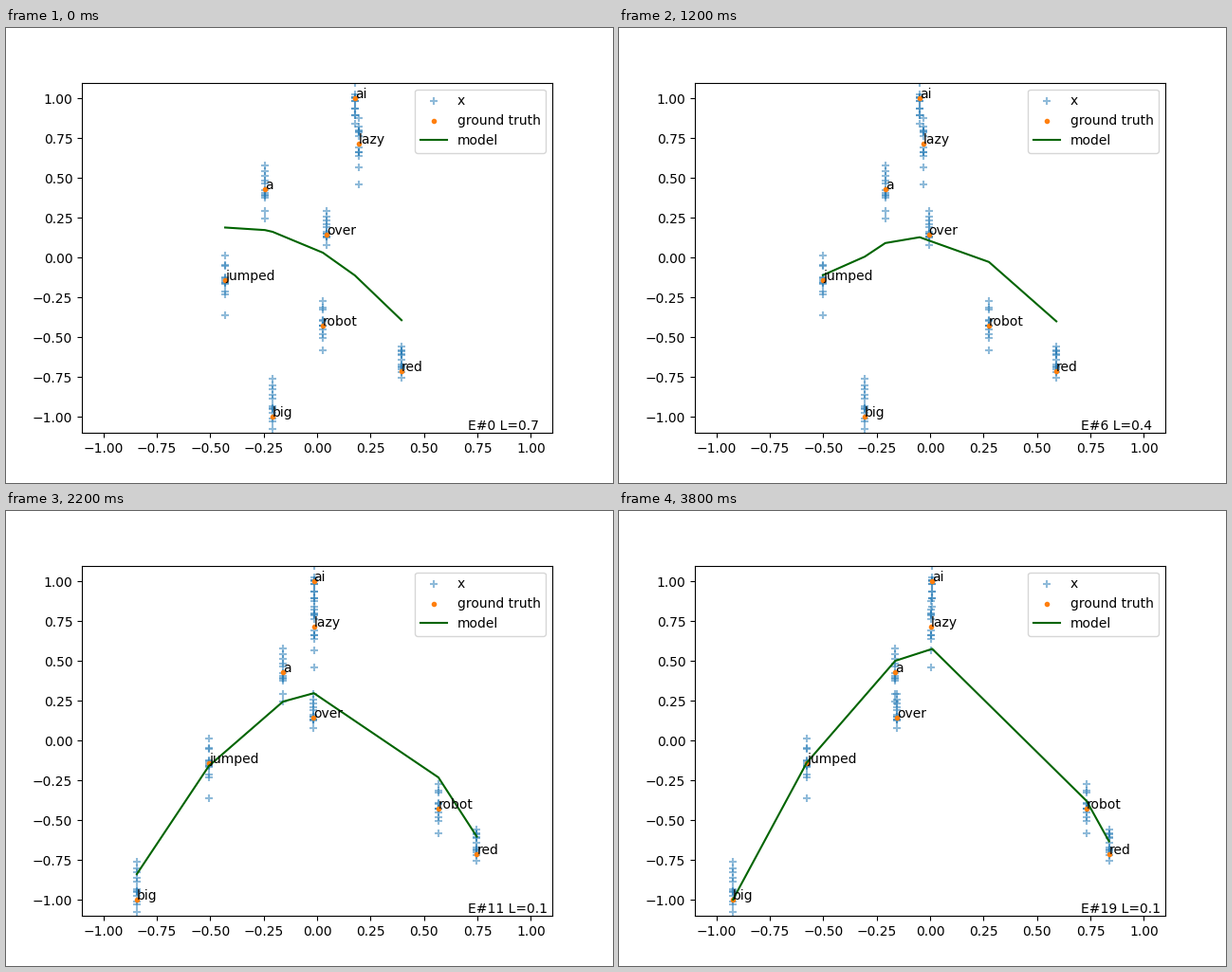
A matplotlib script for the animation above (6000 ms loop, 640 by 480 pixels).

```python
import numpy as np
import matplotlib.pyplot as plt
from matplotlib.animation import FuncAnimation

LAST_EPOCH = 19
FRAMES = 30
SAMPLES = 12

# lowest and highest observation of each word, in order of its level
SPREAD = {
    "big": (-1.073, -.76), "red": (-.756, -.557), "robot": (-.581, -.271),
    "jumped": (-.36, .014), "over": (.08, .294), "a": (.246, .58),
    "lazy": (.461, .877), "ai": (.842, 1.095),
}
WORDS = list(SPREAD)
LEVELS = np.linspace(-1, 1, len(WORDS))

# key points of each word's drift, as epoch: x
DRIFT = {
    "big": {0: -.208, 4: -.2, 8: -.501, 11: -.843, 14: -.927, 19: -.922},
    "red": {0: .395, 8: .652, 13: .79, 19: .837},
    "robot": {0: .027, 8: .368, 13: .661, 19: .732},
    "jumped": {0: -.43, 8: -.51, 11: -.506, 16: -.568, 19: -.577},
    "over": {0: .044, 4: 0, 13: -.022, 16: -.057, 19: -.154},
    "a": {0: -.244, 4: -.229, 8: -.187, 13: -.151, 19: -.163},
    "lazy": {0: .195, 4: -.009, 8: -.039, 11: -.015, 19: .004},
    "ai": {0: .177, 4: -.039, 8: -.052, 11: -.015, 19: .01},
}

# the model bends at these words, as epoch: y
MODEL = {
    "big": {0: .163, 4: .085, 8: -.129, 11: -.837, 13: -.968, 19: -.997},
    "jumped": {0: .19, 4: -.057, 8: -.14, 11: -.158, 13: -.129, 19: -.138},
    "a": {0: .174, 4: .077, 8: .127, 11: .246, 14: .41, 19: .502},
    "ai": {0: -.111, 4: .091, 8: .166, 11: .299, 14: .46, 19: .577},
    "robot": {0: .032, 8: -.057, 11: -.23, 13: -.373, 19: -.378},
    "red": {0: -.392, 4: -.368, 8: -.459, 13: -.658, 19: -.632},
}

LOSS = {0: .7, 2: .43, 6: .36, 11: .13, 19: .08}


def smooth(t, keys):
    """Cubic through the key points that never overshoots them."""
    ts, vs = np.array(list(keys), float), np.array(list(keys.values()))
    d = np.diff(vs) / np.diff(ts)
    inner = [2 * a * b / (a + b) if a * b > 0 else 0 for a, b in zip(d, d[1:])]
    m = [d[0], *inner, d[-1]]
    k = min(np.searchsorted(ts, t, side="right") - 1, len(d) - 1)
    h = ts[k + 1] - ts[k]
    u = (t - ts[k]) / h
    ease = u * u * (3 - 2 * u)
    return (vs[k] + (vs[k + 1] - vs[k]) * ease
            + u * (1 - u) * h * ((1 - u) * m[k] - u * m[k + 1]))


def noisy(rng, level, low, high):
    return [low, high, *rng.triangular(low, level, high, SAMPLES - 2)]


rng = np.random.default_rng(4)
sample_y = np.concatenate([noisy(rng, y, *SPREAD[w])
                           for w, y in zip(WORDS, LEVELS)])

plt.rcParams["font.family"] = "DejaVu Sans"
fig, ax = plt.subplots(figsize=(6.4, 4.8), dpi=100)
crosses = ax.scatter(np.zeros(len(sample_y)), sample_y, marker="+",
                     color="C0", alpha=.5, label="x")
dots = ax.scatter(np.zeros(len(WORDS)), LEVELS, marker=".",
                  color="C1", label="ground truth")
line, = ax.plot([], [], color="darkgreen", label="model")
labels = [ax.text(0, y, w) for w, y in zip(WORDS, LEVELS)]
status = ax.text(.705, -1.08, "")
ax.set_xlim(-1.1, 1.1)
ax.set_ylim(-1.1, 1.1)
ax.legend(loc="upper right")


def update(i):
    epoch = min(i, LAST_EPOCH)
    x = {w: smooth(epoch, DRIFT[w]) for w in WORDS}
    xs = list(x.values())
    crosses.set_offsets(np.column_stack([np.repeat(xs, SAMPLES), sample_y]))
    dots.set_offsets(np.column_stack([xs, LEVELS]))
    for label, pos in zip(labels, xs):
        label.set_x(pos)
    bends = sorted((x[w], smooth(epoch, keys)) for w, keys in MODEL.items())
    line.set_data(*zip(*bends))
    status.set_text(f"E#{epoch} L={smooth(epoch, LOSS):.1f}")
    return crosses, dots, line, status, *labels


anim = FuncAnimation(fig, update, frames=FRAMES, interval=200,
                     init_func=lambda: update(0), repeat=True, repeat_delay=0)
plt.show()
```
